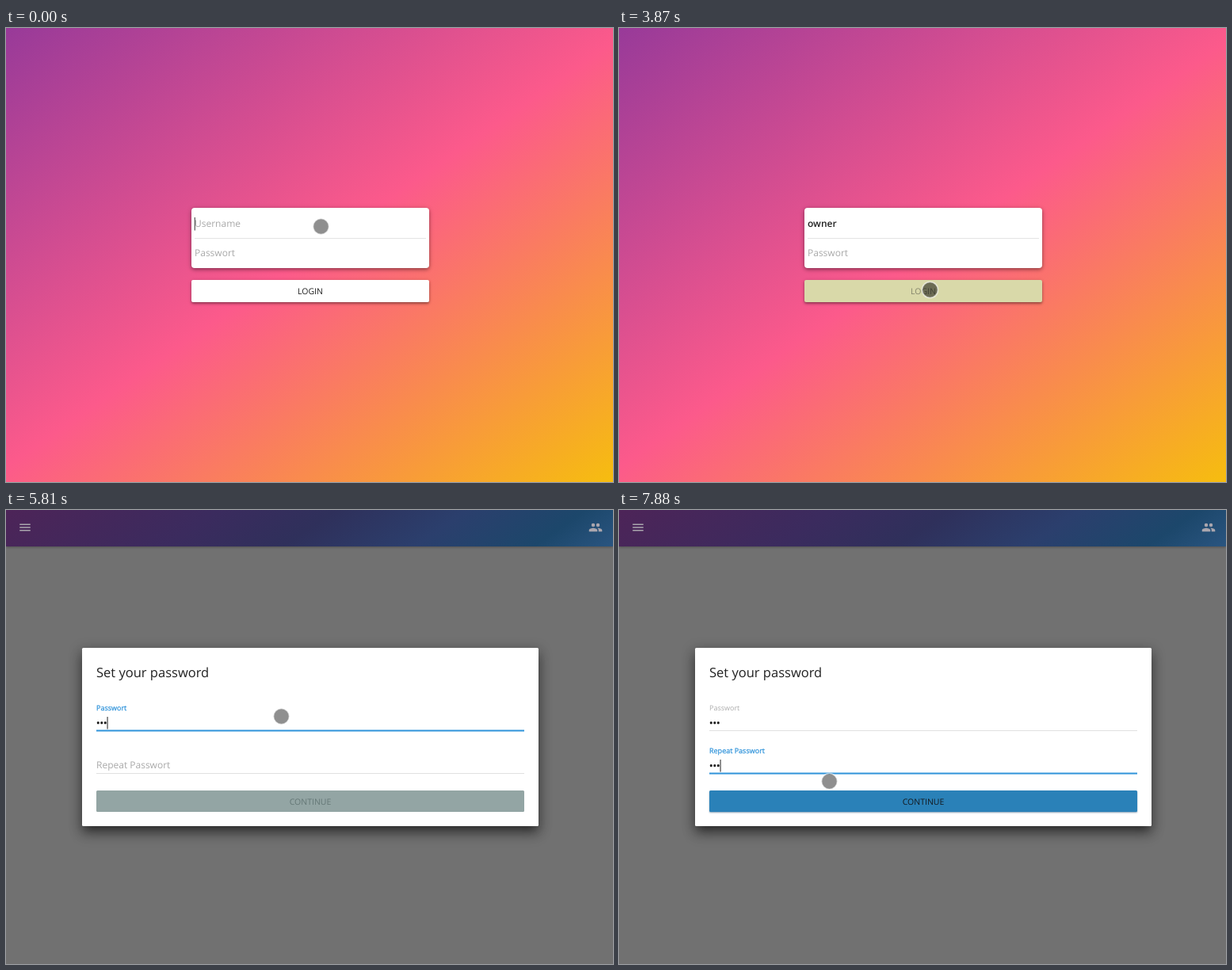
These frames come from a looping animation (766 by 573 pixels, 8000 ms). An HTML page:

```html
<!DOCTYPE html>
<html lang="en">
<head>
<meta charset="utf-8">
<title>Login and set password</title>
<style>
  html, body { margin: 0; width: 100%; height: 100%; overflow: hidden; }
  body { position: relative; background: #717171; }
  div, svg { position: absolute; box-sizing: border-box; }
  svg { left: 0; top: 0; overflow: visible; }
  text { font: 12px "Open Sans", "Noto Sans", sans-serif; fill: #212121; text-rendering: geometricPrecision; }
  .scene { left: 0; top: 0; width: 766px; height: 573px; overflow: hidden; }
  #login { background: linear-gradient(145deg, #983a99, #fc5a8b 50%, #f6bd0f); }
  .card { left: 234px; top: 227px; width: 300px; height: 76px; border-radius: 4px; background: #fff;
    box-shadow: 0 2px 4px rgba(0,0,0,.32), 0 1px 7px rgba(0,0,0,.16); }
  #enter { left: 234px; top: 318px; width: 300px; height: 27.5px; border-radius: 2px;
    box-shadow: 0 2px 3px rgba(0,0,0,.3), 0 1px 5px rgba(0,0,0,.18); }
  .hint { fill: #a9a9a9; }
  .typed { font-weight: 600; }
  .caps { font-size: 10.5px; text-anchor: middle; }
  .label { font-size: 9px; }
  .title { font-size: 16.5px; }
  #app { background: #717171; }
  .bar { left: 0; top: 0; width: 766px; height: 46px; box-shadow: 0 1px 3px rgba(0,0,0,.3);
    background: linear-gradient(145deg, #4d2458, #3b2b5e 32%, #2f305b 50%, #2b3f6d 70%, #1c476b 88%, #2a5580); }
  #dialog { left: 96px; top: 0; width: 576px; height: 225px; border-radius: 1.5px; background: #fff;
    box-shadow: 0 8px 11px -5px rgba(0,0,0,.45), 0 10px 16px 1px rgba(0,0,0,.24), 0 4px 16px 3px rgba(0,0,0,.2); }
  #go { left: 18px; top: 180px; width: 540px; height: 27px; border-radius: 1.5px; }
</style>
</head>
<body>
<div class="scene" id="login">
  <div class="card"></div>
  <div id="enter"></div>
  <svg width="766" height="573">
    <path d="M238 265.5H530" stroke="#e4e4e4"/>
    <text class="hint" id="nameHint" x="238" y="251">Username</text>
    <text class="typed" id="name" x="238" y="251"></text>
    <text class="hint" x="238" y="288">Passwort</text>
    <text class="caps" id="enterText" x="384" y="336">LOGIN</text>
    <path id="nameCaret" d="M.3 239V255.5" stroke="#555" stroke-width="1.2"/>
  </svg>
</div>
<div class="scene" id="app">
  <div class="bar"></div>
  <svg width="766" height="46" fill="#aaa6ae">
    <path transform="translate(15 13) scale(.75)" d="M3 6h18v2H3zM3 11h18v2H3zM3 16h18v2H3z"/>
    <g transform="translate(735 13) scale(.75)">
      <circle cx="8" cy="8" r="3"/><circle cx="16" cy="8" r="3"/>
      <path d="M8 13c-2.3 0-7 1.2-7 3.5V19h14v-2.5c0-2.3-4.7-3.5-7-3.5zM16 13l-1 .1c1.2.8 2 1.9 2 3.4V19h6v-2.5c0-2.3-4.7-3.5-7-3.5z"/>
    </g>
  </svg>
  <div id="dialog">
    <div id="go"></div>
    <svg width="576" height="225">
      <text class="title" x="18" y="36.5">Set your password</text>
      <g id="fields"></g>
      <text class="caps" id="goText" x="288" y="197.7">CONTINUE</text>
    </svg>
  </div>
</div>
<svg width="766" height="573">
  <circle id="pointer" r="10" stroke="rgba(255,255,255,.6)" stroke-width="1.6"/>
</svg>
<script>
const $ = id => document.getElementById(id);
const LOOP = 8000, USER = 'owner', BLUE = '#2f93da';

// A field sits in its own group; its parts are found by class.
const makeField = (hint, y) => {
  const g = document.createElementNS('http://www.w3.org/2000/svg', 'g');
  g.setAttribute('transform', `translate(18 ${y})`);
  g.innerHTML = `
    <path d="M0 24.5H540" stroke="#e0e0e0"/>
    <path class="line" stroke="${BLUE}" stroke-width="1.8"/>
    <text class="label">${hint}</text>
    <text class="hint" y="18">${hint}</text>
    <text class="typed" y="19"></text>
    <path class="caret" d="M.5 7V22.5" stroke="#444" stroke-width="1.2"/>`;
  $('fields').append(g);
  const part = name => g.querySelector('.' + name);
  return { line: part('line'), label: part('label'), hint: part('hint'), typed: part('typed'), caret: part('caret') };
};
const fields = [makeField('Passwort', 80), makeField('Repeat Passwort', 134)];

// Each step changes only what it names; the rest carries over.
// p: pointer, n: name letters, c: caret, press: login button, top: dialog,
// a/b: the fields as [label float, underline, dots], on: field with caret, bold: label weight
const steps = [
  [0, { p: [397.5, 250.5], n: 0, c: 1, press: 0, app: 0, top: 169, a: [0, 0, 0], b: [0, 0, 0], on: -1, bold: 0, ready: 0 }],
  [450, { c: 0 }],
  [900, { c: 1 }],
  [1200, { n: 1 }],
  [1350, { p: [397.5, 252.5] }],
  [1500, { n: 2, p: [397.5, 255] }],
  [1640, { p: [397.5, 256.5] }],
  [1790, { n: 3 }],
  [2090, { n: 4 }],
  [2390, { n: 5 }],
  [2840, { p: [397.5, 282.5] }],
  [2980, { p: [398, 335] }],
  [3130, { p: [397, 373] }],
  [3280, { p: [394, 352] }],
  [3430, { p: [393, 334] }],
  [3720, { p: [392.5, 330.5], c: 0, press: .5 }],
  [3870, { press: 1 }],
  [4170, { app: 1, press: 0 }],
  [4320, { top: 171.5 }],
  [4470, { top: 173.5, p: [392, 338] }],
  [4610, { p: [390, 352] }],
  [4760, { p: [387, 361] }],
  [5060, { p: [368, 306] }],
  [5210, { p: [350, 265] }],
  [5360, { p: [347.5, 260.5], a: [.6, .6, 0], on: 0 }],
  [5510, { a: [1, 1, 1] }],
  [5660, { a: [1, 1, 2] }],
  [5810, { a: [1, 1, 3], bold: 1 }],
  [5950, { p: [308, 270] }],
  [6100, { p: [261, 300] }],
  [6250, { p: [254, 338], on: -1 }],
  [6390, { p: [252, 352] }],
  [6690, { p: [253, 336], a: [1, .7, 3], b: [.5, .4, 0], on: 1, bold: 0 }],
  [6840, { p: [254, 334], a: [1, .2, 3], b: [1, .9, 0] }],
  [6990, { p: [254.5, 333.5], a: [1, .003, 3], b: [1, 1, 0] }],
  [7140, { a: [1, 0, 3] }],
  [7290, { b: [1, 1, 1] }],
  [7430, { b: [1, 1, 2], p: [257, 335] }],
  [7580, { b: [1, 1, 3], p: [261, 338], ready: .6 }],
  [7730, { p: [265, 341], ready: 1 }],
  [7880, { p: [265.5, 342.5], bold: 1 }]
];

const stateAt = t => Object.assign({}, ...steps.filter(s => s[0] <= t).map(s => s[1]));
const mix = (a, b, k) => `rgb(${a.map((v, i) => Math.round(v + (b[i] - v) * k))})`;
const show = (el, on) => { el.style.visibility = on ? 'inherit' : 'hidden'; };
const placeCaret = (caret, text, on) => {
  show(caret, on);
  caret.setAttribute('transform', `translate(${text.textContent ? text.getComputedTextLength() : 0} 0)`);
};

function drawField(f, [float, grow, dots], focused, caretOn, bold) {
  const half = 270 * grow;
  f.line.setAttribute('d', `M${270 - half} 24.5H${270 + half}`);
  show(f.line, grow > 0);
  f.label.setAttribute('y', 18 - 19 * float);
  f.label.style.opacity = float;
  f.label.style.fill = focused ? BLUE : '#adadad';
  f.label.style.stroke = focused && bold ? BLUE : 'none';
  f.label.style.strokeWidth = .25;
  show(f.hint, !dots);
  f.typed.textContent = '•'.repeat(dots);
  placeCaret(f.caret, f.typed, caretOn);
}

function draw(t) {
  const s = stateAt(t);
  show($('login'), !s.app);
  show($('app'), s.app);

  $('name').textContent = USER.slice(0, s.n);
  show($('nameHint'), !s.n);
  placeCaret($('nameCaret'), $('name'), s.c);
  $('nameCaret').setAttribute('transform', `translate(${238 + (s.n ? $('name').getComputedTextLength() : 0)} 0)`);
  $('enter').style.background = mix([255, 255, 255], [217, 217, 169], s.press);
  $('enterText').style.opacity = 1 - .55 * s.press;

  $('dialog').style.top = s.top + 'px';
  drawField(fields[0], s.a, t >= 5360 && t < 6690, s.on === 0, s.bold);
  drawField(fields[1], s.b, t >= 6690, s.on === 1, s.bold);
  $('go').style.background = mix([147, 165, 164], [42, 129, 184], s.ready);
  $('go').style.boxShadow = `0 1px 2px rgba(20,70,110,${.5 * s.ready})`;
  $('goText').style.fill = mix([100, 119, 118], [20, 24, 28], s.ready);

  $('pointer').setAttribute('cx', s.p[0]);
  $('pointer').setAttribute('cy', s.p[1]);
  $('pointer').style.fill = `rgba(0,0,0,${.44 + .06 * s.press})`;
}

function tick() {
  draw(performance.now() % LOOP);
  requestAnimationFrame(tick);
}
tick();
</script>
</body>
</html>
```
